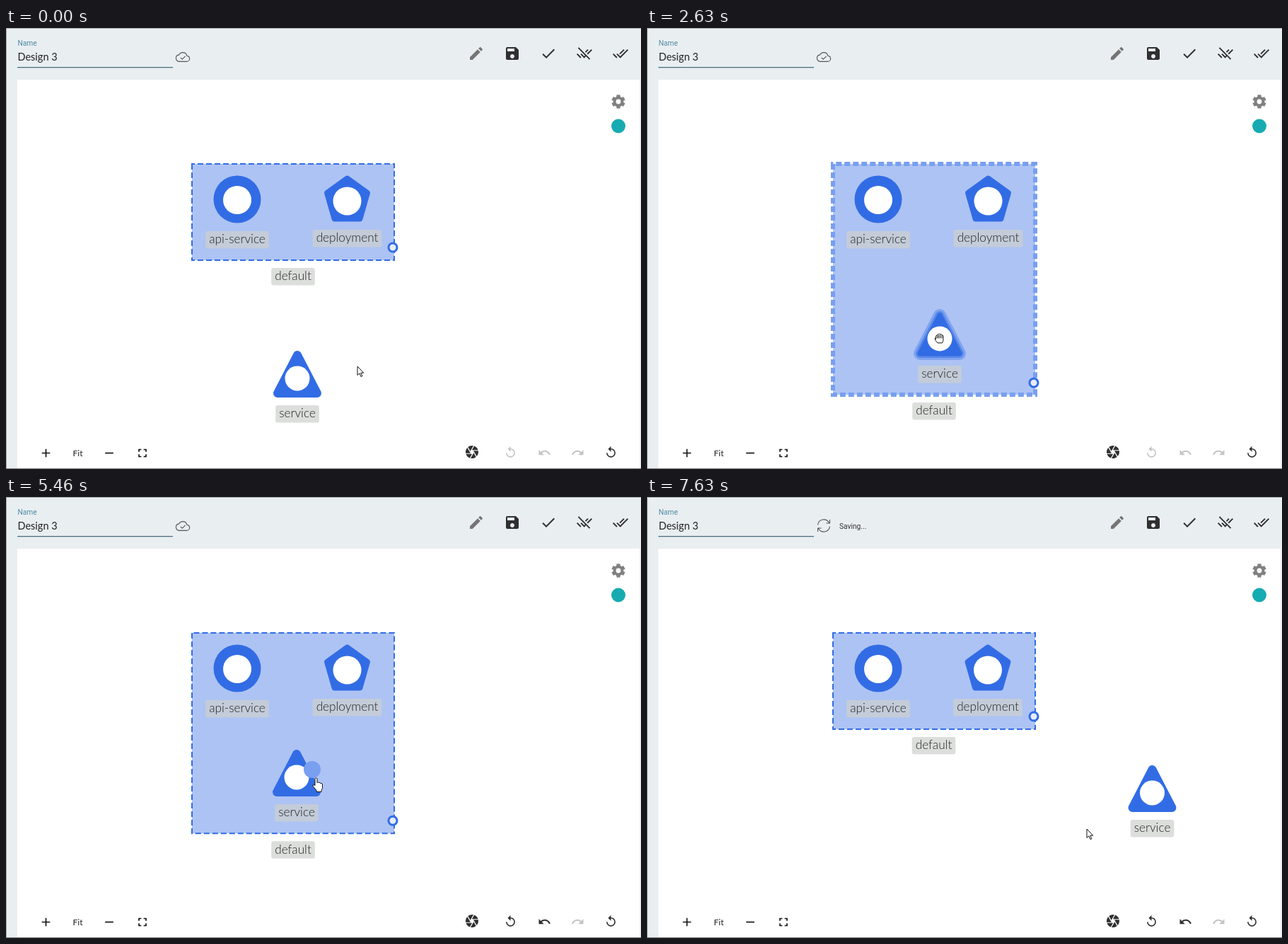
Recreate the animation shown at these times as an HTML page with a canvas. Size 898 px wide and 623 px high, loop 8570 ms.

```html
<!DOCTYPE html>
<html lang="en">
<head>
<meta charset="utf-8">
<title>Design canvas</title>
<style>
  html, body { margin: 0; width: 100%; height: 100%; overflow: hidden; background: #e9eef1; }
  canvas { display: block; }
</style>
</head>
<body>
<canvas id="stage" width="898" height="623"></canvas>
<script>
const ctx = document.getElementById('stage').getContext('2d');
const LOOP = 8570;
const BLUE = '#326ce5', HIGHLIGHT = '#789ff0', DARK = '#303030', FADED = '#c4c4c4';

// Icons on a 24 x 24 grid
const ICONS = {
  edit: 'M3 17.25V21h3.75L17.81 9.94l-3.75-3.75L3 17.25zM20.71 7.04c.39-.39.39-1.02 0-1.41l-2.34-2.34c-.39-.39-1.02-.39-1.41 0l-1.83 1.83 3.75 3.75 1.83-1.83z',
  save: 'M17 3H5c-1.11 0-2 .9-2 2v14c0 1.1.89 2 2 2h14c1.1 0 2-.9 2-2V7l-4-4zm-5 16c-1.66 0-3-1.34-3-3s1.34-3 3-3 3 1.34 3 3-1.34 3-3 3zm3-10H5V5h10v4z',
  check: 'M9 16.2L4.8 12l-1.4 1.4L9 19 21 7l-1.4-1.4L9 16.2z',
  checkAll: 'M18 7l-1.41-1.41-6.34 6.34 1.41 1.41L18 7zm4.24-1.41L11.66 16.17 7.48 12l-1.41 1.41L11.66 19l12-12-1.42-1.41zM.41 13.41L6 19l1.41-1.41L1.83 12 .41 13.41z',
  uncheckAll: 'M1.79 12l5.58 5.59L5.96 19 .37 13.41 1.79 12zm.45-7.78L12.9 14.89l-1.28 1.28L7.44 12l-1.41 1.41L11.62 19l2.69-2.69 4.89 4.89 1.41-1.41L3.65 2.81 2.24 4.22zm14.9 9.27L23.62 7 22.2 5.59l-6.48 6.48 1.42 1.42zM17.96 7l-1.41-1.41-3.65 3.66 1.41 1.41L17.96 7z',
  shutter: 'M9.4 10.5l4.77-8.26C13.47 2.09 12.75 2 12 2c-2.4 0-4.6.85-6.32 2.25l3.66 6.35.06-.1zM21.54 9c-.92-2.92-3.15-5.26-6-6.34L11.88 9h9.66zm.26 1h-7.49l.29.5 4.76 8.25C21 16.97 22 14.61 22 12c0-.69-.07-1.35-.2-2zM8.54 12l-3.9-6.75C3.01 7.03 2 9.39 2 12c0 .69.07 1.35.2 2h7.49l-1.15-2zm-6.08 3c.92 2.92 3.15 5.26 6 6.34L12.12 15H2.46zm11.27 0l-3.9 6.76c.7.15 1.42.24 2.17.24 2.4 0 4.6-.85 6.32-2.25l-3.66-6.35-.93 1.6z',
  reset: 'M12 5V1L7 6l5 5V7c3.31 0 6 2.69 6 6s-2.69 6-6 6-6-2.69-6-6H4c0 4.42 3.58 8 8 8s8-3.58 8-8-3.58-8-8-8z',
  undo: 'M12.5 8c-2.65 0-5.05.99-6.9 2.6L2 7v9h9l-3.62-3.62c1.39-1.16 3.16-1.88 5.12-1.88 3.54 0 6.55 2.31 7.6 5.5l2.37-.78C21.08 11.03 17.15 8 12.5 8z',
  plus: 'M19 13h-6v6h-2v-6H5v-2h6V5h2v6h6v2z',
  minus: 'M19 13H5v-2h14z',
  expand: 'M7 14H5v5h5v-2H7v-3zm-2-4h2V7h3V5H5v5zm12 7h-3v2h5v-5h-2v3zM14 5v2h3v3h2V5h-5z',
};
for (const name in ICONS) ICONS[name] = new Path2D(ICONS[name]);

const CLOUD = new Path2D('M19.35 10.04C18.67 6.59 15.64 4 12 4 9.11 4 6.6 5.64 5.35 8.04 2.34 8.36 0 10.91 0 14c0 3.31 2.69 6 6 6h13c2.76 0 5-2.24 5-5 0-2.64-2.05-4.78-4.65-4.96zM8 13l3 3 5.5-5.5');
const SYNC_HALF = new Path2D('M-8.5-1A8.5 8.5 0 0 1 7.5-4M8.5-8.5V-3.5H3.5');
const CURSORS = {
  arrow: new Path2D('M0 0V12.5L2.9 9.8 5 14.6 6.9 13.7 4.8 9.2H8.7Z'),
  hand: new Path2D('M-2 10V1Q-2-.5-.5-.5T1 1V6Q2 5 3.5 6Q5 5.5 6 7Q8 6.5 8.5 8.5V13Q8.5 15 7 16.5V19H0V17L-5 11Q-5.5 9-4 9Z'),
  grab: new Path2D('M-5 1V-3Q-4-5-3-3.5V-5Q-2-7-1-5.5Q0-7.5 1.2-5.5Q2.5-7 3.5-4.5Q5.5-5 5.5-2.5V2Q5.5 4 4 6.5H-2.5Q-6 3-6.5 .5Q-6.5-1-5 1ZM-3-3.5V0M-1-5V0M1.2-5V0M3.5-4V0'),
};
const PENTAGON = new Path2D('M0-28.5L28.5-8 18 28.5H-18L-28.5-8Z');
const TRIANGLE = new Path2D('M0-83L28-29H-28Z');

// Keyframes: [time, x, y]. The service node is placed by the centre of its label.
const SERVICE_PATH = [
  [0, 412, 545], [1250, 412, 545], [1280, 411.5, 544.5], [1730, 411.5, 544.5],
  [2570, 414.5, 493], [2630, 414, 489], [3090, 412, 451.5], [3290, 411, 446],
  [5710, 411, 446], [5800, 430, 448], [6040, 573, 462.5], [6300, 665, 467], [6540, 714.5, 468],
];
const CURSOR_PATH = [
  [410, 497, 478], [1250, 412.5, 498], [1730, 412.5, 498], [3290, 410.5, 395.5],
  [3600, 410.5, 395.5], [4330, 594.5, 416], [4670, 594.5, 416], [5460, 439, 397.5],
  [5710, 439, 397.5], [6540, 742, 419], [7180, 742, 419], [7630, 622, 469],
];
const linear = u => u;
const smooth = u => u * u * (3 - 2 * u);
const within = (t, from, to) => t >= from && t < to;

function follow(path, t, ease) {
  const next = path.findIndex(key => key[0] > t);
  if (next === 0) return { x: path[0][1], y: path[0][2] };
  if (next < 0) { const [, x, y] = path.at(-1); return { x, y }; }
  const [t0, x0, y0] = path[next - 1], [t1, x1, y1] = path[next];
  const u = ease((t - t0) / (t1 - t0));
  return { x: x0 + (x1 - x0) * u, y: y0 + (y1 - y0) * u };
}

function at(x, y, draw, sx = 1, sy = sx) {
  ctx.save();
  ctx.translate(x, y);
  ctx.scale(sx, sy);
  draw();
  ctx.restore();
}

function icon(name, x, y, color = DARK, sx = 1, sy = Math.abs(sx)) {
  at(x, y, () => {
    ctx.translate(-12, -12);
    ctx.fillStyle = color;
    ctx.fill(ICONS[name]);
  }, sx, sy);
}

function text(str, x, y, font, color, align = 'left') {
  ctx.font = font;
  ctx.fillStyle = color;
  ctx.textAlign = align;
  ctx.fillText(str, x, y);
}

function disc(x, y, r, color) {
  ctx.beginPath();
  ctx.arc(x, y, r, 0, Math.PI * 2);
  ctx.fillStyle = color;
  ctx.fill();
}

function rounded(shape, color, lineWidth) {
  ctx.fillStyle = ctx.strokeStyle = color;
  ctx.lineWidth = lineWidth;
  ctx.lineJoin = 'round';
  ctx.fill(shape);
  ctx.stroke(shape);
}

function label(str, x, y) {
  const font = '300 17.2px Lato, sans-serif';
  ctx.font = font;
  const w = ctx.measureText(str).width + 10;
  ctx.beginPath();
  ctx.roundRect(x - w / 2, y - 12, w, 24.5, 3);
  ctx.fillStyle = 'rgba(205,208,206,.7)';
  ctx.fill();
  text(str, x, y + 5.3, font, '#222', 'center');
}

function gear(x, y) {
  at(x, y, () => {
    ctx.strokeStyle = ctx.fillStyle = '#808080';
    ctx.lineWidth = 4;
    ctx.beginPath();
    ctx.arc(0, 0, 5.4, 0, Math.PI * 2);
    ctx.stroke();
    for (let i = 0; i < 6; i++) {
      ctx.fillRect(-2.6, -9.6, 5.2, 4);
      ctx.rotate(Math.PI / 3);
    }
  });
}

function saveStatus(saving) {
  ctx.strokeStyle = '#555';
  ctx.lineJoin = 'round';
  if (saving) {
    ctx.lineWidth = 1.1;
    at(250, 40.5, () => {
      ctx.stroke(SYNC_HALF);
      ctx.rotate(Math.PI);
      ctx.stroke(SYNC_HALF);
    });
    text('Saving...', 272, 44.5, '10.2px Roboto, sans-serif', '#333');
  } else {
    ctx.lineWidth = 1.4;
    at(250, 41, () => {
      ctx.translate(-12, -12);
      ctx.stroke(CLOUD);
    }, .8);
  }
}

function chrome(t) {
  ctx.fillStyle = '#e9eef1';
  ctx.fillRect(0, 0, 898, 623);
  ctx.fillStyle = '#fff';
  ctx.fillRect(16, 73, 880, 549);
  ctx.fillStyle = '#a2a7aa';
  ctx.fillRect(0, 0, 898, 1);
  ctx.fillRect(0, 0, 1, 623);
  ctx.fillStyle = '#777b7e';
  ctx.fillRect(0, 622, 898, 1);

  text('Name', 16.5, 25, '10.2px Roboto, sans-serif', '#4f8ba4');
  text('Design 3', 16.5, 46, '14.5px Lato, sans-serif', '#222');
  ctx.fillStyle = '#4d707f';
  ctx.fillRect(16, 55, 220, 1.3);
  saveStatus(within(t, 3690, 4910) || t >= 7240);

  icon('edit', 665, 36, '#757575');
  icon('save', 716, 36);
  icon('check', 767, 36);
  icon('uncheckAll', 818, 36, DARK, .95);
  icon('checkAll', 869, 36, DARK, .95);
  gear(866, 104);
  disc(866, 138.5, 10, '#16abb0');
}

function toolbar(t) {
  const history = t >= 3690 ? DARK : FADED;
  icon('plus', 56.5, 600.5, '#111', .83);
  text('Fit', 94.5, 604.5, '12px Lato, sans-serif', '#222');
  icon('minus', 146, 600.5, '#111', .83);
  icon('expand', 193, 600.5, '#111', .83);
  icon('shutter', 659, 599, DARK, .9);
  icon('reset', 713.5, 599.5, history, .8);
  icon('undo', 761.5, 600, history, .8);
  icon('undo', 808.5, 600, FADED, -.8);
  icon('reset', 855.5, 599.5, DARK, .8);
}

// The group stretches to hold the service node while it is a member.
function groupCorner(t) {
  const node = follow(SERVICE_PATH, t, linear);
  const member = t >= 2600 && node.x < 635;
  return {
    member,
    right: member ? Math.max(549, node.x + 57) : 549,
    bottom: member ? node.y + 29.2 : 328,
  };
}

function group(t, dragging) {
  const { member, right, bottom } = groupCorner(t);
  const nudge = within(t, 1280, 2600) || (t > 5710 && !member) ? -.5 : 0;
  const active = member && dragging;

  // The outline runs counterclockwise so that its dashes start down the left side.
  ctx.beginPath();
  ctx.moveTo(263, 192);
  ctx.lineTo(263, bottom);
  ctx.lineTo(right, bottom);
  ctx.lineTo(right, 192);
  ctx.closePath();
  ctx.fillStyle = '#adc3f4';
  ctx.fill();
  ctx.strokeStyle = active ? HIGHLIGHT : BLUE;
  ctx.lineWidth = active ? 6 : 2;
  ctx.lineJoin = 'miter';
  ctx.setLineDash([8, 4]);
  ctx.stroke();
  ctx.setLineDash([]);
  label('default', (263 + right) / 2 + nudge, bottom + 23);

  disc(327, 242, 33.5, BLUE);
  disc(327, 243, 20, '#fff');
  label('api-service', 327, 299);

  at(482.5 + nudge, 241, () => {
    rounded(PENTAGON, BLUE, 8);
    disc(0, 3.5, 20, '#fff');
  });
  label('deployment', 482.5 + nudge, 297);

  // The corner grip trails the group's edge slightly.
  const earlier = groupCorner(t - 15);
  const grip = earlier.member === member ? earlier : { right, bottom };
  disc(grip.right - 2, grip.bottom - 18, 7.5, BLUE);
  disc(grip.right - 2, grip.bottom - 18, 4.5, '#e6edfc');
}

function service(t, dragging) {
  const { x, y } = follow(SERVICE_PATH, t, linear);
  at(x, y, () => {
    if (dragging) {
      rounded(TRIANGLE, '#80a5ee', 18);
      rounded(TRIANGLE, '#5988e9', 12);
    }
    rounded(TRIANGLE, BLUE, dragging ? 7 : 12);
    disc(0, -50, 17.5, '#fff');
    if (within(t, 1280, 1730) || within(t, 5310, 5710)) disc(22, -61, 12, HIGHLIGHT);
  });
  label('service', x, y);
}

function cursor(t, dragging) {
  const node = follow(SERVICE_PATH, t, linear);
  let { x, y } = follow(CURSOR_PATH, t, smooth);
  const hovering = Math.abs(x - node.x) < 32 && within(y, node.y - 85, node.y - 23);
  let shape = hovering ? 'hand' : 'arrow';
  if (dragging) {
    shape = 'grab';
    x = node.x + (t < 4000 ? -.5 : 28);
    y = node.y + (t < 4000 ? -50.5 : -48.5);
  }
  at(x, y, () => {
    ctx.fillStyle = '#fff';
    ctx.strokeStyle = '#111';
    ctx.lineWidth = 1;
    ctx.fill(CURSORS[shape]);
    ctx.stroke(CURSORS[shape]);
  });
}

function frame() {
  const t = performance.now() % LOOP;
  const dragging = within(t, 1730, 3290) || within(t, 5710, 6570);
  chrome(t);
  group(t, dragging);
  service(t, dragging);
  toolbar(t);
  cursor(t, dragging);
  requestAnimationFrame(frame);
}
frame();
</script>
</body>
</html>
```
